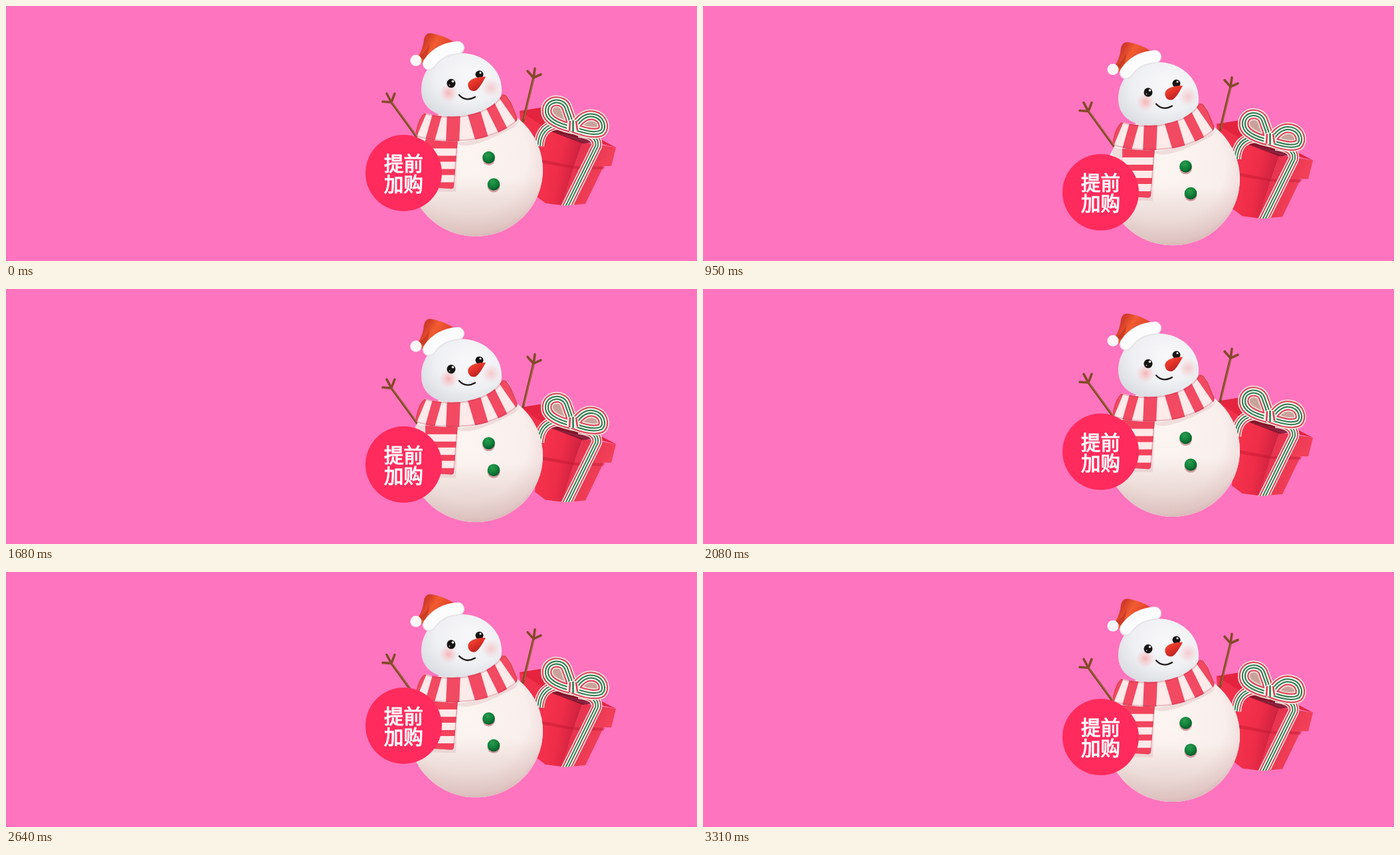
Animation, 1040 px wide and 384 px high, one loop 3.37 s. Source, as an HTML page:

```html
<!DOCTYPE html>
<html lang="zh">
<head>
<meta charset="utf-8">
<title>Snowman</title>
<style>
  html, body { margin: 0; width: 100%; height: 100%; overflow: hidden; background: #ff74be; }
  svg { display: block; width: 1040px; height: 384px; }
  .badge text {
    font: 400 29.5px "Noto Sans CJK SC", "Noto Sans CJK", sans-serif;
    fill: #fff; stroke: #fff; stroke-width: 1.1px; text-anchor: middle;
  }
  .twig { fill: none; stroke: #84492a; stroke-width: 3.6; stroke-linecap: round; stroke-linejoin: round; }
  .twig .light { stroke: #ad7044; stroke-width: 1; }
  .ribbon path { fill: none; stroke-linejoin: round; }
</style>
</head>
<body>
<svg viewBox="0 0 1040 384">
  <defs>
    <radialGradient id="snow" cx=".45" cy=".4" r=".62">
      <stop offset="0" stop-color="#fcf5f1"/><stop offset=".7" stop-color="#f9efec"/>
      <stop offset=".92" stop-color="#f0dedd"/><stop offset="1" stop-color="#e6c8cb"/>
    </radialGradient>
    <linearGradient id="shade" x2="0" y2="1">
      <stop offset=".55" stop-color="#c9a5a0" stop-opacity="0"/><stop offset="1" stop-color="#c9a5a0" stop-opacity=".5"/>
    </linearGradient>
    <radialGradient id="face" cx=".6" cy=".35" r=".7">
      <stop offset="0" stop-color="#f8f8fa"/><stop offset=".6" stop-color="#eff0f3"/>
      <stop offset="1" stop-color="#dadde2"/>
    </radialGradient>
    <radialGradient id="blush">
      <stop offset="0" stop-color="#f8a5a8" stop-opacity=".8"/><stop offset="1" stop-color="#f8b5b8" stop-opacity="0"/>
    </radialGradient>
    <linearGradient id="cap" x2="1" y2=".5">
      <stop offset="0" stop-color="#d93a2b"/><stop offset=".25" stop-color="#d03a28"/>
      <stop offset=".5" stop-color="#f25c30"/><stop offset="1" stop-color="#dc3a2a"/>
    </linearGradient>
    <linearGradient id="carrot" x2=".7" y2="1">
      <stop offset="0" stop-color="#f4553f"/><stop offset=".5" stop-color="#e33128"/><stop offset="1" stop-color="#a9201f"/>
    </linearGradient>
    <radialGradient id="button" cx=".4" cy=".3" r=".7">
      <stop offset="0" stop-color="#2a9c4e"/><stop offset=".6" stop-color="#0f8039"/><stop offset="1" stop-color="#07582a"/>
    </radialGradient>
    <linearGradient id="side" x2="1" y2=".2">
      <stop offset="0" stop-color="#f9334e"/><stop offset=".6" stop-color="#ee2d48"/><stop offset="1" stop-color="#cf2240"/>
    </linearGradient>
    <linearGradient id="front" x2="1" y2=".4">
      <stop offset="0" stop-color="#e42f4a"/><stop offset="1" stop-color="#f24059"/>
    </linearGradient>
    <clipPath id="boxClip"><path d="M770 130H920V240L872 298L838 301L796 300Z"/></clipPath>
    <clipPath id="bodyClip"><ellipse cx="707" cy="247" rx="101" ry="100"/></clipPath>
    <clipPath id="wrapClip">
      <path id="wrap" d="M630 161Q654 168 683 166Q731 160 747 133Q754 132 759 142L769 166Q772 173 762 179Q735 197 700 202Q655 207 622 198Q615 195 617 187Q621 168 630 161Z"/>
    </clipPath>
    <clipPath id="tailClip"><path d="M631 201H680L674 272Q673 276 668 275L632 273Z"/></clipPath>
  </defs>

  <g id="gift">
    <path d="M773 158L805 153L918 213L818 188L806 232L776 190Z" fill="#e4243f"/>
    <path d="M773 158L818 187L806 232L776 200Z" fill="#f1314b"/>
    <path d="M800 226L858 238L836 300L812 297L796 285Z" fill="url(#side)"/>
    <path d="M856 236L900 240L872 298L836 301Z" fill="url(#front)"/>
    <path d="M803 231L858 240L902 242L899 246L856 245L802 236Z" fill="#b9152f" opacity=".4"/>
    <path d="M817 187L868 205L855 241L806 231Z" fill="url(#side)"/>
    <path d="M868 205L918 213L911 241L855 241Z" fill="url(#front)"/>
    <path d="M815 187Q840 184 893 204L868 207Z" fill="#6f1122" opacity=".8"/>
    <g class="ribbon" data-d="M832 178Q804 180 802 211" data-size=".9"></g>
    <g clip-path="url(#boxClip)">
      <g class="ribbon" data-d="M862 190Q892 194 889 211L840 310" data-size=".9"></g>
    </g>
    <g class="ribbon" data-d="M853 184C835 180 812 172 814 156C816 140 838 140 843 152C847 162 851 175 853 184Z" data-size="1" data-fill="#c9a39b"></g>
    <g class="ribbon" data-d="M855 184C862 172 872 162 885 165C899 168 902 183 896 189C886 194 868 189 855 184Z" data-size="1" data-fill="#c9a39b"></g>
    <path d="M845 174Q854 167 861 175L863 186Q854 192 844 186Z" fill="#f6f2ee"/>
    <path d="M849 173L848 188M858 173L860 187" stroke="#d93c4e" stroke-width="2.5"/>
    <path d="M853.500 172V189" stroke="#287448" stroke-width="2.500"/>
  </g>

  <g id="snowman">
    <g class="twig">
      <path d="M623 204L580 145M567 144L580 145L573 132M585 132L580 145"/>
      <path d="M778 174L794 108L785 98M796 94L794 108L805 103"/>
      <path class="light" d="M619 197L581 145M780 170L794 110"/>
    </g>
    <g clip-path="url(#bodyClip)">
      <path d="M606 147H808V347H606Z" fill="#f9efec"/>
      <ellipse cx="707" cy="247" rx="101" ry="100" fill="url(#snow)"/>
      <ellipse cx="707" cy="247" rx="101" ry="100" fill="url(#shade)"/>
      <path d="M614 198Q690 222 772 174L766 182Q700 218 680 208L677 280L640 279Z" fill="#c99c9f" opacity=".25"/>
    </g>

    <g clip-path="url(#tailClip)">
      <path d="M625 200H682V277H625Z" fill="#f2435d"/>
      <path d="M625 220H682M625 240H682M625 260H682" stroke="#fdeae9" stroke-width="11"/>
      <path d="M680 200L674 276L632 274" fill="none" stroke="#b93b4c" stroke-width="2.500" opacity=".4"/>
    </g>

    <path d="M625 126C625 94 651 71 684 71C718 71 746 94 746 127C746 153 719 168 682 168C650 168 625 156 625 126Z" fill="url(#face)"/>
    <use href="#wrap" fill="#fdeae9"/>
    <g clip-path="url(#wrapClip)" stroke="#f24a62">
      <path d="M627 160L612 196" stroke-width="12"/>
      <path d="M650 160L637 206" stroke-width="14"/>
      <path d="M674 160L672 208" stroke-width="20"/>
      <path d="M703 156L718 206" stroke-width="20"/>
      <path d="M726 144L750 192" stroke-width="15"/>
      <path d="M744 131L774 174" stroke-width="11"/>
      <use href="#wrap" fill="none" stroke="#a82b44" stroke-width="4" opacity=".25"/>
    </g>

    <path d="M621 75Q628 63 629 50Q631 40 640 41Q658 44 674 54L640 82L626 86Z" fill="url(#cap)"/>
    <path d="M622 76Q633 69 637 57Q637 72 629 81Z" fill="#a92420" opacity=".45"/>
    <path d="M637 87Q652 65 680 63" fill="none" stroke="#e7e4e8" stroke-width="20" stroke-linecap="round"/>
    <path d="M637 86Q652 64 680 62.500" fill="none" stroke="#fdfcfc" stroke-width="17.500" stroke-linecap="round"/>
    <circle cx="617" cy="82" r="8.500" fill="#fbf7f8"/>

    <circle cx="666" cy="131" r="14" fill="url(#blush)"/>
    <circle cx="730" cy="123" r="15" fill="url(#blush)" opacity=".65"/>
    <g fill="#171414">
      <ellipse cx="670" cy="116.500" rx="6.500" ry="6.800"/>
      <ellipse cx="712.500" cy="103" rx="6" ry="5.800"/>
    </g>
    <g fill="#fff">
      <circle cx="672.500" cy="113.500" r="1.800"/>
      <circle cx="714" cy="100.500" r="1.500"/>
      <circle cx="667.500" cy="119" r=".8"/>
    </g>
    <path d="M722 106.500Q710 106 702 110Q694 114 695.500 121Q698 130 707 127.500Q713 124 722 106.500Z" fill="url(#carrot)"/>
    <path d="M682 134Q692 145 706 137" fill="none" stroke="#201a1a" stroke-width="2.300" stroke-linecap="round"/>

    <g fill="#b76e73" opacity=".65"><circle cx="726.500" cy="230.500" r="9.500"/><circle cx="734" cy="271" r="9.500"/></g>
    <circle cx="726.500" cy="228" r="9.300" fill="url(#button)"/>
    <circle cx="734" cy="268.500" r="9.300" fill="url(#button)"/>
  </g>

  <g id="badge" class="badge">
    <circle cx="598.500" cy="251.500" r="57.500" fill="#ff2b5c"/>
    <text x="598.500" y="248">提前</text>
    <text x="598.500" y="279">加购</text>
  </g>
</svg>
<script>
  const LOOP = 3370, STEP = LOOP / 60;

  // Vertical offsets as [time, y]; each list repeats after one loop.
  const tracks = {
    snowman: [[0, 0], [500, 8.5], [950, 13.5], [1150, 13.8], [1680, 4.3], [2080, -4], [2440, -8], [2640, -7.4], [2860, -5.6], [3310, -.8]],
    badge: [[0, 0], [500, 17.5], [950, 29], [1150, 29.5], [1680, 13], [2080, -6.5], [2640, -20], [3310, -3]],
    gift: [[0, 0], [500, 12], [950, 19.5], [1310, 22.5], [1680, 20.5], [2080, 11], [2640, -7], [2900, -8.5], [3310, -1.2]]
  };

  function sample(keys, time) {
    const n = keys.length;
    const at = i => {
      const turn = Math.floor(i / n), [t, y] = keys[i - turn * n];
      return [t + turn * LOOP, y];
    };
    const slope = i => {
      const [t0, y0] = at(i - 1), [t1, y1] = at(i + 1);
      return (y1 - y0) / (t1 - t0);
    };
    let i = n - 1;
    while (keys[i][0] > time) i--;
    const [t0, y0] = at(i), [t1, y1] = at(i + 1);
    const span = t1 - t0, u = (time - t0) / span, v = 1 - u;
    return y0 * v * v * (1 + 2 * u) + y1 * u * u * (1 + 2 * v)
      + span * u * v * (slope(i) * v - slope(i + 1) * u);
  }

  // Nested strokes give stripes that follow the ribbon.
  const stripes = [[18, "#efe2dc"], [14.5, "#dc3f54"], [10.5, "#f8f2ee"], [6, "#2b7a4b"], [2, "#f8f2ee"]];
  for (const ribbon of document.querySelectorAll(".ribbon")) {
    const { d, size, fill } = ribbon.dataset;
    stripes.forEach(([width, color], i) => {
      const path = document.createElementNS(ribbon.namespaceURI, "path");
      path.setAttribute("d", d);
      path.setAttribute("stroke", color);
      path.setAttribute("stroke-width", width * size);
      if (fill && i === 0) path.style.fill = fill;
      ribbon.append(path);
    });
  }

  const parts = Object.keys(tracks).map(id => [document.getElementById(id), tracks[id]]);
  const start = performance.now();

  function draw(now) {
    const elapsed = Math.max(0, now - start) % LOOP;
    const time = Math.floor((elapsed + 8) / STEP) * STEP % LOOP;
    for (const [part, keys] of parts)
      part.setAttribute("transform", `translate(0 ${sample(keys, time).toFixed(2)})`);
    requestAnimationFrame(draw);
  }
  draw(start);
</script>
</body>
</html>
```
